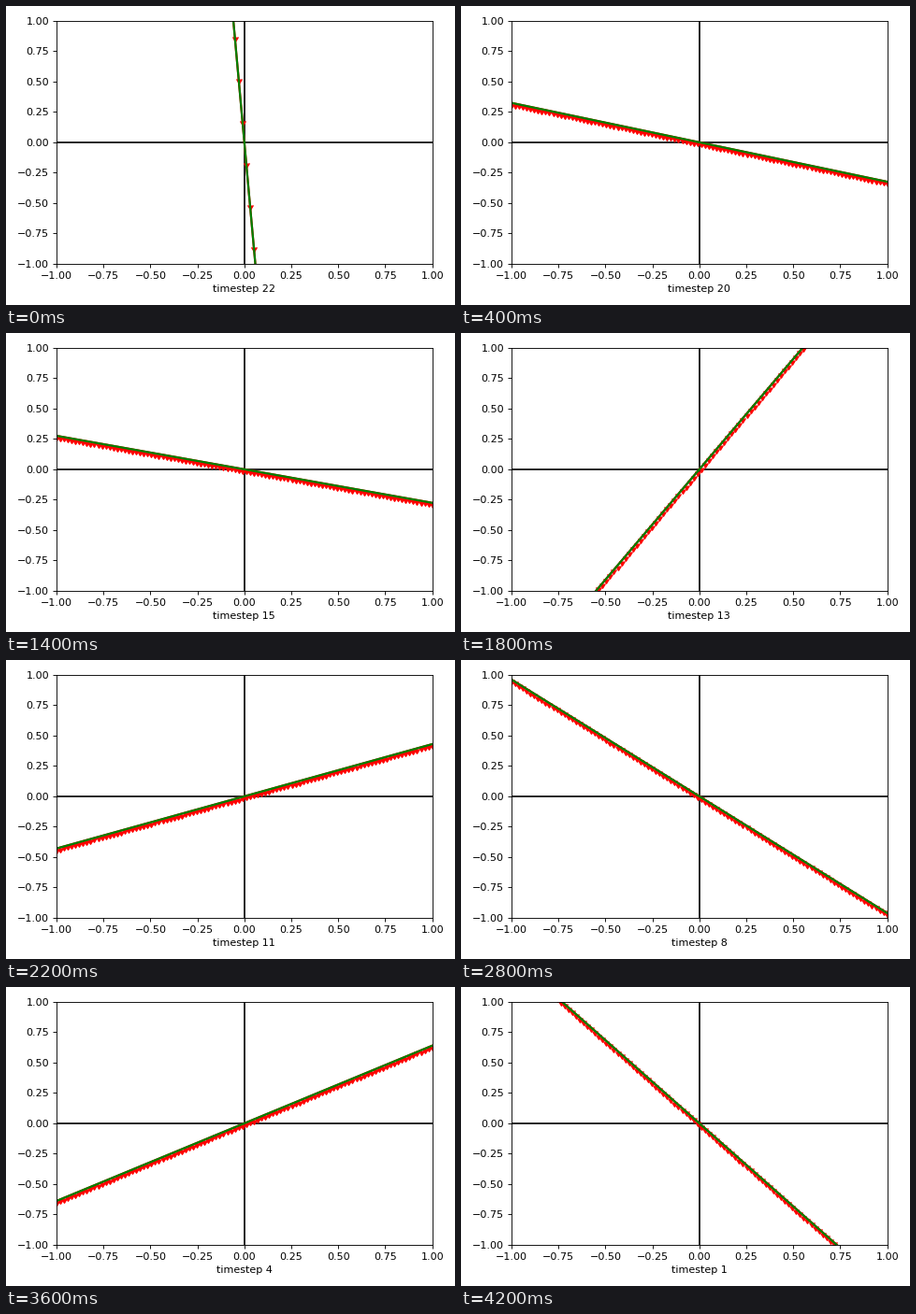
A matplotlib script for the animation above (4.4 s loop, 480x320 px).

```python
import numpy as np
import matplotlib.pyplot as plt
from matplotlib.animation import FuncAnimation
from matplotlib.markers import CARETDOWNBASE

STEPS = 22
# Heading of the line in degrees at every second timestep, from 22 down to 0;
# it turns evenly in between.
HEADINGS = [-86.66, -18, -53.45, -138.9, 108.02, 14.4,
            32.14, 136.1, 250.4, 212.62, 105, 147.26]
KEY_FRAMES = 2 * np.arange(len(HEADINGS))

fig, ax = plt.subplots(figsize=(6, 4), dpi=80)
xs = np.linspace(-1, 1, 100)
ticks = np.linspace(-1, 1, 9)

ax.axhline(0, color="black", lw=1.5)
ax.axvline(0, color="black", lw=1.5)
guess, = ax.plot(xs, xs, color="red", lw=2, marker=CARETDOWNBASE, ms=6)
truth, = ax.plot(xs, xs, color="green", lw=2)

ax.set(xlim=(-1, 1), ylim=(-1, 1), xticks=ticks, yticks=ticks,
       xlabel=f"timestep {STEPS}")
fig.tight_layout()


def update(i):
    heading = np.interp(i, KEY_FRAMES, HEADINGS)
    ys = np.tan(np.radians(heading)) * xs
    guess.set_ydata(ys)
    truth.set_ydata(ys)
    ax.set_xlabel(f"timestep {STEPS - i}")
    return guess, truth


anim = FuncAnimation(fig, update, frames=STEPS, interval=200, repeat=True)
plt.show()
```
